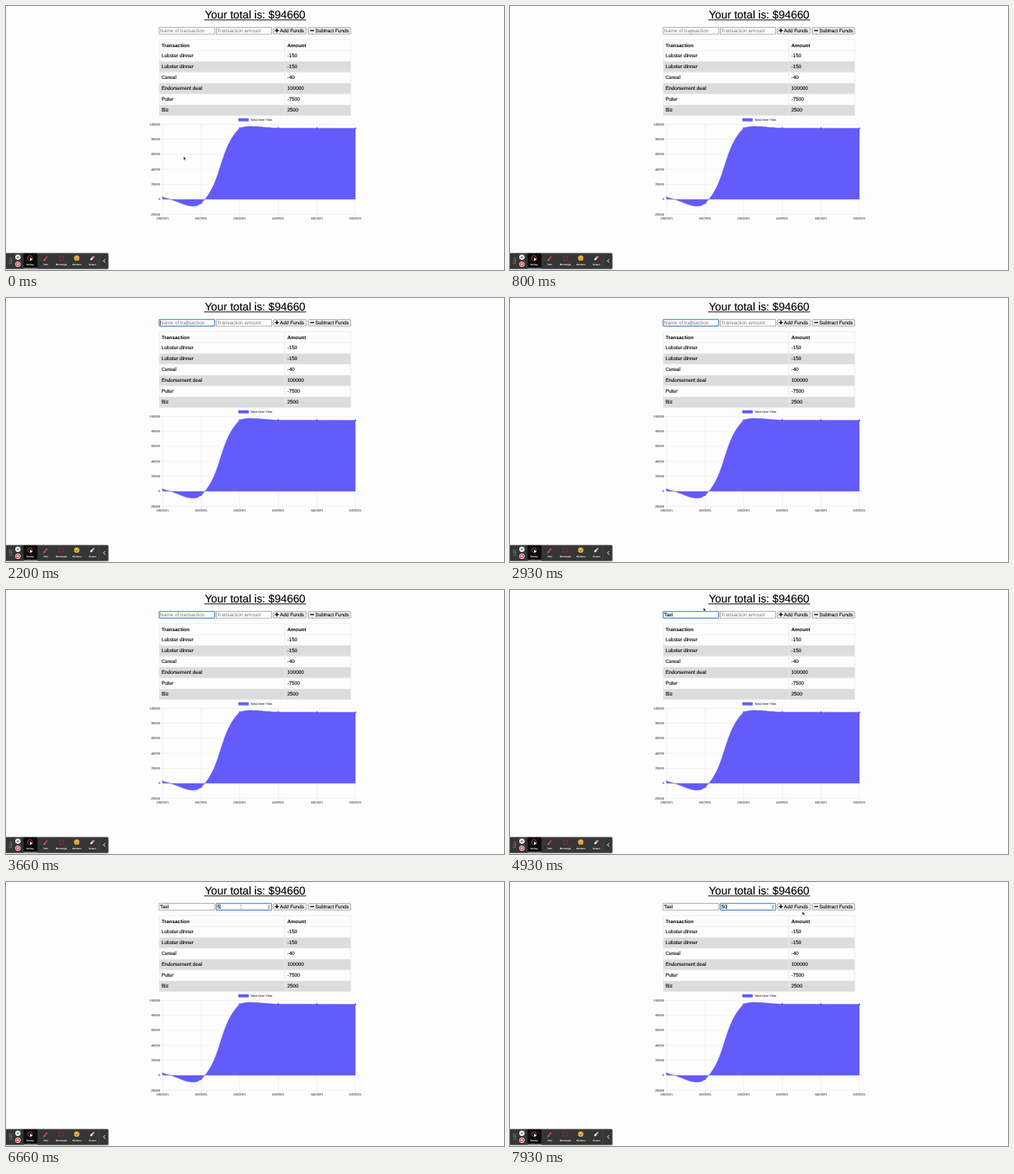
Animation of 640 by 340 pixels, one loop 8000 ms. Source, as an HTML page:

```html
<!DOCTYPE html>
<html lang="en">
<head>
<meta charset="utf-8">
<title>Budget tracker</title>
<style>
  html, body { margin: 0; width: 100%; height: 100%; overflow: hidden; background: #fdfdfd; }
  svg { display: block; width: 640px; height: 340px; }
  text {
    font-family: "Liberation Sans", Arial, sans-serif; font-size: 6.4px; white-space: pre;
    text-rendering: geometricPrecision; stroke: #000; stroke-width: .12px;
  }
  .bold { font-weight: bold; stroke: none; }
  .hint { fill: #757575; stroke: none; }
  .axis { font-size: 4.05px; fill: #555; stroke: #555; }
  .tool { font-size: 3.05px; font-weight: bold; fill: #fff; stroke: none; text-anchor: middle; }
</style>
</head>
<body>
<svg id="stage" viewBox="0 0 640 340"></svg>
<script>
const LOOP = 8000;
const stage = document.getElementById('stage');

const rect = (x, y, w, h, fill, more = '') =>
  `<rect x="${x}" y="${y}" width="${w}" height="${h}" fill="${fill}" ${more}/>`;
const path = (d, more) => `<path d="${d}" ${more}/>`;
const text = (x, y, s, more = '') => `<text x="${x}" y="${y}" ${more}>${s}</text>`;
const circle = (x, y, r, fill, more = '') => `<circle cx="${x}" cy="${y}" r="${r}" fill="${fill}" ${more}/>`;
const stroke = (color, width) => `fill="none" stroke="${color}" stroke-width="${width}"`;

function heading() {
  return text(320.1, 15.9, 'Your total is: $94660', 'text-anchor="middle" style="font-size:14.25px"') +
    rect(254.7, 17.4, 130.8, 1, '#000');
}

function field(id, x, hint) {
  return rect(x, 27.7, 71.2, 8.4, '#fff', 'stroke="#777" stroke-width=".6"') +
    rect(x, 27.7, 71.2, 8.5, 'none', `id="${id}Ring" rx=".8" stroke="#3f8ae0" stroke-width="1"`) +
    text(x + 1.2, 34.2, hint, `id="${id}Hint" class="hint"`) +
    text(x + 1.2, 34.2, '', `id="${id}Text"`);
}

function button(x, w, label, labelX, plus) {
  const cx = labelX - 3.9;
  return rect(x, 27.7, w, 8.4, '#efefef', 'rx=".8" stroke="#777" stroke-width=".6"') +
    path(`M${cx - 2.5} 31.6h5` + (plus ? `M${cx} 29.1v5` : ''), stroke('#000', 1.4)) +
    text(labelX, 34.2, label);
}

function table() {
  const rows = [['Lobster dinner', -150], ['Lobster dinner', -150], ['Cereal', -40],
    ['Endorsement deal', 100000], ['Puter', -7500], ['Biz', 2500]];
  const body = rows.map(([name, amount], i) => {
    const y = 57.3 + i * 14;
    return (i % 2 ? rect(197, y + .4, 246, 13.1, '#dadddb') : '') +
      text(200, y + 9.1, name) + text(361.5, y + 9.1, amount);
  }).join('');
  const lines = [0, 1, 2, 3, 4, 5, 6, 7].map(i => `M197 ${43.4 + i * 14}h246`).join('');
  return body + path(lines + 'M197 43.4v98M443 43.4v98', stroke('#e4e5e4', .6)) +
    path('M358.2 43.4v98', stroke('#ececec', 1)) +
    text(200, 52.5, 'Transaction', 'class="bold"') + text(361.5, 52.5, 'Amount', 'class="bold"');
}

function chart() {
  const left = 201.3, step = 49.56, right = left + 5 * step, zero = 249, top = 152.4;
  const yOf = v => zero - v * (zero - top) / 1e5;
  const totals = [2500, -5000, 95000, 94960, 94810, 94660];
  const pts = totals.map((v, i) => ({ x: left + i * step, y: yOf(v) }));
  const dist = (a, b) => Math.hypot(a.x - b.x, a.y - b.y);

  // Smooth curve with a tension of 0.4, kept inside the chart area
  const ctrl = pts.map((p, i) => {
    const a = pts[i - 1] || p, b = pts[i + 1] || p;
    const da = dist(a, p), db = dist(p, b), k = .4 / (da + db);
    const at = f => `${p.x + f * (b.x - a.x)} ${Math.max(top, p.y + f * (b.y - a.y))}`;
    return { before: at(-k * da), after: at(k * db) };
  });
  let line = `M${pts[0].x} ${pts[0].y}`;
  for (let i = 1; i < pts.length; i++)
    line += `C${ctrl[i - 1].after} ${ctrl[i].before} ${pts[i].x} ${pts[i].y}`;

  let grid = '', labels = '';
  for (let v = 100000; v >= -20000; v -= 20000) {
    grid += `M198 ${yOf(v)}H${right}`;
    labels += text(198, yOf(v) + 1.4, v, 'class="axis" text-anchor="end"');
  }
  for (const p of pts) {
    grid += `M${p.x} ${top}V271`;
    labels += text(p.x, 275.3, '5/6/2021', 'class="axis" text-anchor="middle"');
  }
  return path(grid, stroke('#e6e6e6', .5)) +
    path(`${line}V${zero}H${left}Z`, 'fill="#635bfa"') +
    path(line, stroke('#635bfa', .5)) +
    path(`M${left} ${zero}H${right}`, stroke('#9a96d8', .4)) +
    pts.map(p => circle(p.x, p.y, 1.1, '#5a52e0')).join('') +
    rect(298.5, 144.6, 13.4, 4, '#635bfa') +
    text(314, 148.2, 'Total Over Time', 'class="axis"') + labels;
}

function toolbar() {
  const names = ['Mouse', 'Pen', 'Rectangle', 'Stickers', 'Eraser'];
  const dots = [0, 1, 2, 3].map(i =>
    circle(5, 325.2 + i * 2.2, .6, '#aaa') + circle(7.2, 325.2 + i * 2.2, .6, '#aaa')).join('');
  return rect(-1, 318.2, 132.6, 20.6, '#363636', 'rx="1.5" stroke="#777" stroke-width=".6"') + dots +
    circle(15.3, 323.6, 3.4, '#fff') + path('M14.4 322.2v2.8M16.2 322.2v2.8', stroke('#333', .8)) +
    circle(15.3, 332.6, 3.4, '#fff') + circle(15.3, 332.6, 2.7, '#e04545') + rect(14.3, 331.6, 2, 2, '#fff') +
    rect(22.5, 318.6, 18, 19.8, '#0c0c0c') + rect(22.5, 337.5, 18, 1, '#c9dde2') +
    circle(30.8, 324.6, 3, 'none', 'stroke="#d9534f" stroke-width=".8"') +
    path('M30.5 323.6l4 3.4-2 .2-1 1.6z', 'fill="#fff"') +
    path('M49.4 327l3.6-4.4', stroke('#e0353f', 1.9)) + path('M48.6 328.2l.4-1.6 1.1.9z', 'fill="#fff"') +
    rect(68.4, 322.1, 5.4, 5.2, 'none', 'stroke="#b01c28" stroke-width=".9"') +
    circle(90.9, 324.7, 3.4, '#f5c04a') +
    circle(89.7, 323.8, .5, '#5a3a10') + circle(92.1, 323.8, .5, '#5a3a10') +
    path('M89 325.4q1.9 2.6 3.8 0z', 'fill="#b5402c"') +
    path('M108.8 326.8l2.2-2.2', stroke('#eee', 2.4)) + path('M110.4 325.2l2.8-2.8', stroke('#e58d96', 2.4)) +
    names.map((s, i) => text(31.2 + i * 20, 333.6, s, 'class="tool"')).join('') +
    path('M119.6 318.6v20', stroke('#555', .5)) +
    path('M127.4 326l-2 2.3 2 2.3', stroke('#fff', .9));
}

stage.innerHTML = rect(0, 0, 640, 340, '#fdfdfd') + heading() +
  field('name', 196.9, 'Name of transaction') + field('amount', 270.2, 'Transaction amount') +
  button(343.8, 42.2, 'Add Funds', 352, true) + button(388.6, 54.4, 'Subtract Funds', 397.4, false) +
  table() + chart() + toolbar() +
  '<g id="spinner">' + rect(336, 28.6, 3.6, 6.6, '#e8e8e8') +
  path('M336.8 31.2l1-1.3 1 1.3zM336.8 32.6l1 1.3 1-1.3z', 'fill="#444"') + '</g>' +
  rect(0, 28.7, .5, 6.4, '#000', 'id="caret"') +
  path('M0 0v4.4l1-.9.8 1.7.8-.4-.8-1.6h1.4z', 'id="arrow" fill="#111" stroke="#fff" stroke-width=".3"') +
  path('M-1-2.6q1 0 1 .6v4q0 .6-1 .6M1-2.6q-1 0-1 .6M0 2q0 .6 1 .6', 'id="beam" ' + stroke('#777', .4));

const el = id => document.getElementById(id);
const show = (id, on) => el(id).setAttribute('visibility', on ? 'visible' : 'hidden');

const NAME_FOCUS = 1000, AMOUNT_FOCUS = 5860;
const TYPING_START = 3530, TYPING_END = 4920;
const nameKeys = [3860, 4000, 4260, 4400], amountKeys = [6650, 6800];
// Pointer stops: time, x, y
const stops = [[0, 228.3, 193.8], [60, 228.3, 193.8], [860, 232.8, 32], [TYPING_START, 232.8, 32],
  [TYPING_END, 248.6, 22.8], [5460, 291, 22.8], [5660, 291, 22.8], [5840, 302, 32],
  [7190, 302, 32], [7900, 375.7, 38], [LOOP, 375.7, 38]];

function pointer(t) {
  const i = stops.findIndex(s => s[0] > t);
  const [t0, x0, y0] = stops[i - 1], [t1, x1, y1] = stops[i];
  const u = (t - t0) / (t1 - t0), e = u * u * (3 - 2 * u);
  return [x0 + (x1 - x0) * e, y0 + (y1 - y0) * e];
}

function setField(id, word, keys, t) {
  const typed = word.slice(0, keys.filter(k => k <= t).length);
  el(id + 'Text').textContent = typed;
  show(id + 'Hint', !typed);
}

function draw(t) {
  setField('name', 'Taxi', nameKeys, t);
  setField('amount', '50', amountKeys, t);

  const onAmount = t >= AMOUNT_FOCUS, onName = t >= NAME_FOCUS && !onAmount;
  show('nameRing', onName);
  show('amountRing', onAmount);

  const last = Math.max(0, ...[NAME_FOCUS, AMOUNT_FOCUS, ...nameKeys, ...amountKeys].filter(k => k <= t));
  const entry = el(onAmount ? 'amountText' : 'nameText');
  const width = entry.textContent ? entry.getComputedTextLength() : 0;
  el('caret').setAttribute('x', +entry.getAttribute('x') + width);
  show('caret', (onName || onAmount) && (t - last) % 1000 < 500);

  const [x, y] = pointer(t);
  const inRow = y > 27.5 && y < 36.2;
  const overAmount = inRow && x > 270 && x < 341.5;
  const overText = overAmount || inRow && x > 196.5 && x < 268.5;
  const hidden = t >= TYPING_START && t < TYPING_END;
  show('spinner', onAmount || overAmount);
  show('beam', overText && !hidden);
  show('arrow', !overText && !hidden);
  for (const id of ['beam', 'arrow']) el(id).setAttribute('transform', `translate(${x} ${y})`);
}

function tick() {
  draw(performance.now() % LOOP);
  requestAnimationFrame(tick);
}
tick();
</script>
</body>
</html>
```
